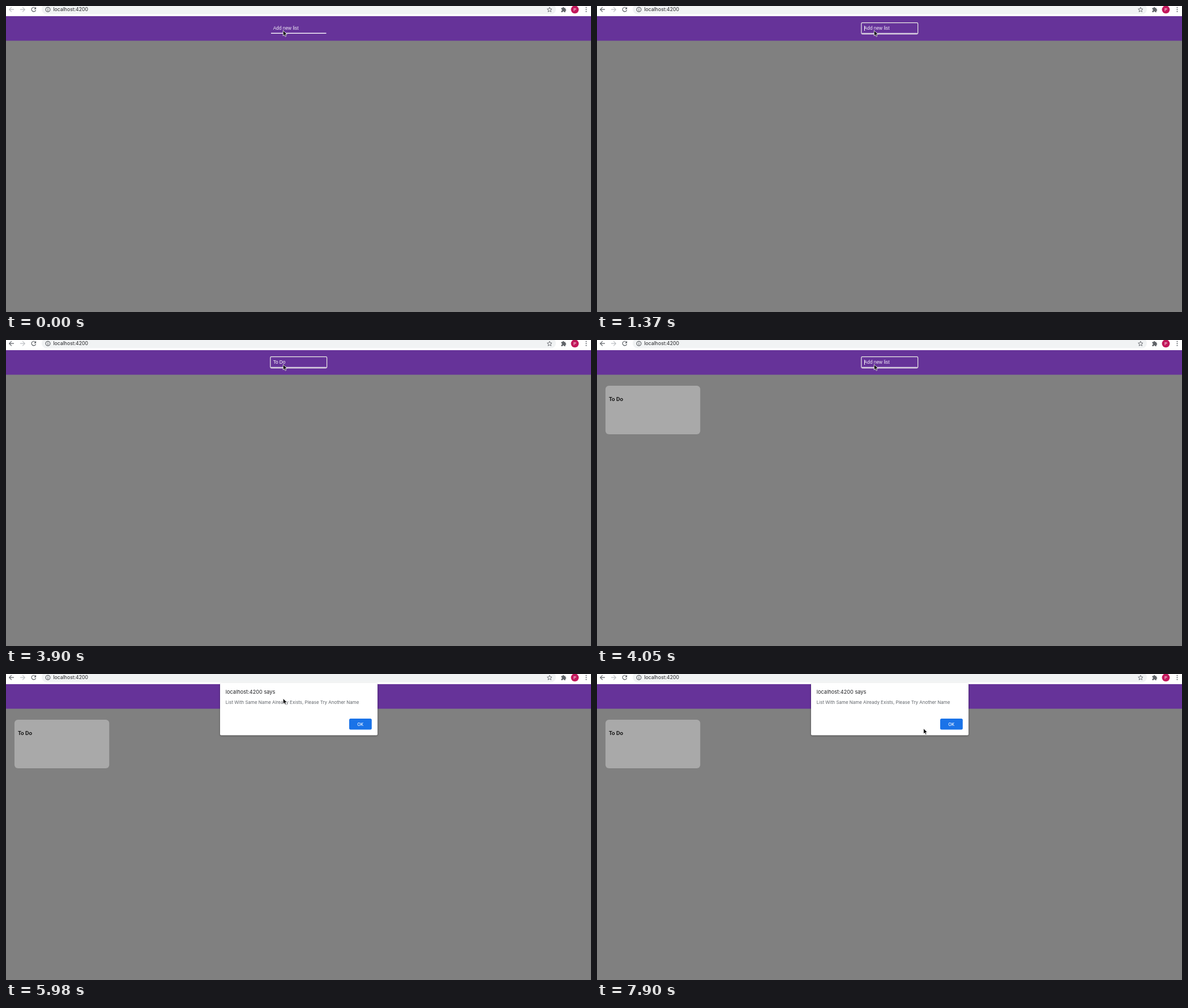
Animation of 1033 by 542 pixels, one loop 8 s. Source, as an HTML page:

```html
<!DOCTYPE html>
<html lang="en">
<head>
<meta charset="utf-8">
<title>Add a list</title>
<style>
  html, body { margin: 0; width: 100%; height: 100%; overflow: hidden; background: #808080; }
  svg { display: block; width: 1033px; height: 542px; }
  text { white-space: pre; }
  .ui { font-family: Inter, sans-serif; fill: #202124; }
  .field { font: 8.3px "Liberation Sans", Arial, sans-serif; }
  .icon { fill: none; stroke: #5f6368; stroke-width: 1.2; }
  .off { stroke: #bcbfc3; }
  .solid { fill: #5f6368; }
  #dialog { filter: drop-shadow(0 1px 1.5px rgba(0, 0, 0, .4)); }
</style>
</head>
<body>
<svg viewBox="0 0 1033 542">
  <rect width="1033" height="542" fill="#808080"/>
  <rect width="1033" height="18" fill="#fff"/>
  <rect y="18" width="1033" height="43.5" fill="#639"/>

  <!-- Browser toolbar -->
  <rect x="63" y="-3" width="908" height="17.6" rx="8.8" fill="#f1f3f4"/>
  <path id="back" class="icon" d="M14 6.2H5.8M9.8 2.1L5.7 6.2l4.1 4.1"/>
  <path class="icon off" d="M25 6.2h8.2M29.2 2.1l4.1 4.1-4.1 4.1"/>
  <path class="icon" d="M51.9 3.6A3.8 3.8 0 1 0 52.6 7.3"/>
  <path class="solid" d="M53.1 1.8v4h-4z"/>
  <circle class="icon" cx="74" cy="6.3" r="3.9" stroke-width="1"/>
  <path class="icon" d="M74 5.8v2.7M74 3.9v1.1"/>
  <text class="ui" x="83.5" y="9.4" font-size="8.7">localhost:4200</text>
  <path class="icon" style="stroke-width:.9" d="M959.8 2.2l1.2 2.8 3 .3-2.3 2 .7 3-2.6-1.6-2.6 1.6.7-3-2.3-2 3-.3z"/>
  <path class="solid" d="M980.5 3.5h2.2a1.4 1.4 0 0 1 2.8 0h2.3v2.3a1.4 1.4 0 0 1 0 2.8v2.3h-2.2a1.4 1.4 0 0 0-2.8 0h-2.3V8.6a1.4 1.4 0 0 0 0-2.8z"/>
  <circle cx="1004.5" cy="6.3" r="6.9" fill="#c2185b"/>
  <text x="1004.5" y="9" font-size="7.6" font-family="Roboto, sans-serif" fill="#fff" text-anchor="middle">P</text>
  <g class="solid">
    <circle cx="1024.5" cy="2.8" r="1"/><circle cx="1024.5" cy="6.3" r="1"/><circle cx="1024.5" cy="9.8" r="1"/>
  </g>

  <!-- List field -->
  <g id="field">
    <rect id="underline" x="468" y="47.6" width="97.5" height="1.4" fill="#fff"/>
    <rect id="ring" x="466.8" y="29.6" width="99.8" height="20" rx="1.8" fill="none" stroke="#eceee6" stroke-width="1.2"/>
    <text id="entry" class="field" x="471.8" y="42.4"></text>
    <rect id="caret" y="35" width="1" height="9" fill="#fff"/>
  </g>

  <g id="card">
    <rect x="15" y="81" width="167.3" height="86" rx="6" fill="#a9a9a9"/>
    <text x="21" y="107.6" font-family="Roboto, sans-serif" font-size="9.9" font-weight="500">To Do</text>
  </g>

  <g id="dialog">
    <rect x="378" y="16" width="278" height="92.6" rx="2" fill="#fff"/>
    <text class="ui" x="387.8" y="35.3" font-size="9.2">localhost:4200 says</text>
    <text class="ui" x="387.8" y="53.3" font-size="7.95" style="fill:#5f6368">List With Same Name Already Exists, Please Try Another Name</text>
    <rect x="606" y="79" width="39.8" height="19.6" rx="2.5" fill="#1a73e8"/>
    <text class="ui" x="625.8" y="91.5" font-size="7.5" font-weight="500" style="fill:#fff" text-anchor="middle">OK</text>
  </g>

  <path id="pointer" d="M0 0v9.6l2.2-2 1.5 3.4 1.7-.8-1.5-3.2h3z" fill="#000" stroke="#fff" stroke-width=".8"/>
</svg>
<script>
const LOOP = 8000;
const el = id => document.getElementById(id);

// Field steps: start time, typed text, caret visible
const typing = [
  [0, '', false], [150, '', true], [930, '', false], [1370, '', true],
  [1820, 'T', true], [1960, 'To', true], [2260, 'To ', true], [2410, 'To d', true],
  [2860, 'To d', false], [3000, 'To ', true], [3300, 'To D', true], [3450, 'To Do', true],
  [3900, 'To Do', false], [4050, '', true], [4490, '', false],
  [5090, 't', true], [5230, 'tod', true], [5380, 'todo', true]
];

// Pointer steps: start time, tip position
const moves = [
  [0, 489.3, 43.3], [6730, 500, 62], [6880, 532, 118], [7020, 552.5, 148],
  [7460, 558, 138], [7610, 568, 120], [7760, 578, 102], [7900, 576.6, 96.4]
];

const at = (steps, t) => steps.findLast(step => step[0] <= t);
const show = (id, on) => el(id).setAttribute('visibility', on ? 'inherit' : 'hidden');

function draw(t) {
  const [, typed, caretOn] = at(typing, t);
  const [, x, y] = at(moves, t);
  const focused = t >= 150, alerting = t >= 5980;
  const entry = el('entry');

  entry.textContent = typed || 'Add new list';
  entry.setAttribute('fill', typed ? '#fff' : '#f3eef8');
  const width = typed ? entry.getComputedTextLength() : 0;
  el('caret').setAttribute('x', Math.round(472 + width));
  el('underline').setAttribute('fill', focused ? '#c3b0d8' : '#fff');
  el('back').classList.toggle('off', t < 330);

  show('caret', caretOn);
  show('ring', focused);
  show('field', !alerting);
  show('card', t >= 4050);
  show('dialog', alerting);
  el('pointer').setAttribute('transform', `translate(${x} ${y})`);
}

const start = performance.now();
function tick() {
  draw((performance.now() - start) % LOOP);
  requestAnimationFrame(tick);
}
tick();
</script>
</body>
</html>
```
